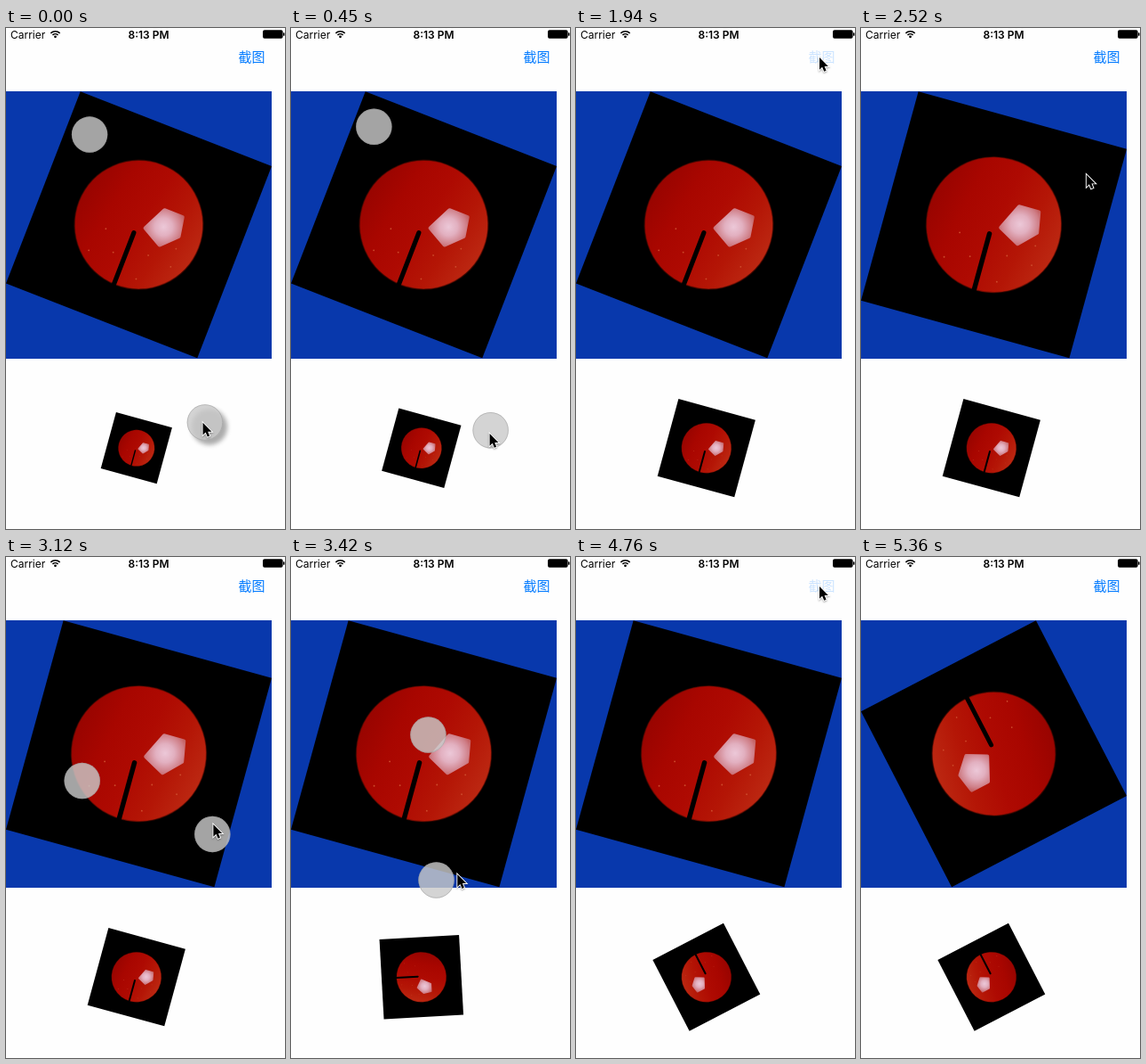
An HTML page with a canvas that plays this animation: 314x562 px, repeating every 5.77 s.

```html
<!DOCTYPE html>
<html lang="zh">
<head>
<meta charset="utf-8">
<style>
  html, body { margin: 0; width: 100%; height: 100%; overflow: hidden; background: #fefefe; }
  canvas { display: block; }
</style>
</head>
<body>
<canvas id="stage" width="314" height="562"></canvas>
<script>
const ctx = document.getElementById('stage').getContext('2d');
const LOOP = 5770, STEP = 148.9, LAST = 36;
const TAU = Math.PI * 2, RAD = Math.PI / 180;
const PIVOT = { x: 159, y: 281 };
const BUTTON = { x: 274, y: 33 };
const ANGLES = { first: 21.25, second: 15.4, third: 152.6 };

const mix = (a, b, f) => a + (b - a) * f;
const ramp = (k, from, to) => Math.max(0, Math.min(1, (k - from) / (to - from)));
const smooth = (k, from, to) => {
  const f = ramp(k, from, to);
  return f * f * (3 - 2 * f);
};

const turn = k => 11 + 151.6 * smooth(k, 20, 26) - 10 * smooth(k, 26, 28);

function finger(k) {
  const opening = ramp(k, 0, 7);
  const [angle, reach] = k < 14
    ? [mix(68.1, 70, opening), mix(174, 238.8, opening ** 2.4)]
    : [turn(k), mix(78, 84, smooth(k, 19, 26))];
  return { x: reach * Math.cos(angle * RAD), y: reach * Math.sin(angle * RAD) };
}

function pointer(k) {
  const f = finger(k < 14 ? k + .5 : k - .5);
  const toButton = k < 14 ? smooth(k, 8, 12)
    : k < 20 ? 1 - smooth(k, 14, 18) : smooth(k, 28, 30.5);
  return {
    x: mix(PIVOT.x + f.x - 2, BUTTON.x, toButton),
    y: mix(PIVOT.y + f.y, BUTTON.y, toButton)
  };
}

function disc(x, y, r, fill) {
  ctx.fillStyle = fill;
  ctx.beginPath();
  ctx.arc(x, y, r, 0, TAU);
  ctx.fill();
}

function text(str, x, y, font, fill) {
  ctx.font = font;
  ctx.fillStyle = fill;
  ctx.fillText(str, x, y);
}

function shade(gradient, ...colors) {
  colors.forEach((c, i) => gradient.addColorStop(i / (colors.length - 1), c));
  return gradient;
}

// Black tile with a glossy ball, designed on a 232 unit square
function tile(x, y, side, angle) {
  ctx.save();
  ctx.translate(x, y);
  ctx.rotate(angle * RAD);
  ctx.scale(side / 232, side / 232);
  ctx.fillStyle = '#000';
  ctx.fillRect(-116, -116, 232, 232);

  disc(0, 0, 72.5, shade(ctx.createLinearGradient(-72, -15, 72, 15),
    '#980400', '#a80600', '#ae0a02', '#b41606', '#bc2812'));
  ctx.strokeStyle = 'rgba(90,10,0,.5)';
  ctx.lineWidth = 1.5;
  ctx.stroke();
  for (let i = 0; i < 8; i++) {
    const a = .2 + i * .35, r = 50 + 14 * Math.sin(i * 2.4);
    disc(r * Math.cos(a), r * Math.sin(a), .9, '#cc4c2c');
  }

  ctx.beginPath();
  for (const p of [[8, 1], [21, -26], [43, -26], [47, -4], [30, 13]]) ctx.lineTo(...p);
  ctx.closePath();
  ctx.fillStyle = ctx.strokeStyle = shade(ctx.createRadialGradient(27, -8, 0, 27, -8, 30),
    '#ecc8d8', '#e2b0c0', '#cf7f88', '#b8403c');
  ctx.lineWidth = 4;
  ctx.lineJoin = 'round';
  ctx.fill();
  ctx.stroke();

  ctx.strokeStyle = '#000';
  ctx.lineWidth = 5.2;
  ctx.lineCap = 'round';
  ctx.beginPath();
  ctx.moveTo(-2, 10.5);
  ctx.lineTo(-2, 73);
  ctx.stroke();
  ctx.restore();
}

function snapshot(angle) {
  ctx.fillStyle = '#0838ac';
  ctx.fillRect(0, 71, 299, 300);
  const a = angle * RAD;
  tile(149.5, 220.7, 299 / (Math.abs(Math.cos(a)) + Math.abs(Math.sin(a))), angle);
}

function statusBar() {
  text('Carrier', 5, 11.5, '12px Inter, sans-serif', '#000');
  text('8:13 PM', 137.5, 11.5, '600 12px Inter, sans-serif', '#000');
  ctx.strokeStyle = '#000';
  ctx.lineWidth = 1.6;
  for (const r of [4.3, 7.3]) {
    ctx.beginPath();
    ctx.arc(55.5, 11, r, -135 * RAD, -45 * RAD);
    ctx.stroke();
  }
  disc(55.5, 9.8, 1.4, '#000');
  ctx.beginPath();
  ctx.roundRect(289, 2.3, 22.6, 9.4, 2);
  ctx.roundRect(312, 5.2, 1.5, 3.6, .6);
  ctx.fill();
}

function touch(x, y, raised) {
  ctx.save();
  if (raised) {
    ctx.shadowColor = 'rgba(0,0,0,.4)';
    ctx.shadowBlur = 5;
    ctx.shadowOffsetX = ctx.shadowOffsetY = 5;
  }
  disc(x, y, 20.2, 'rgba(202,202,202,.81)');
  ctx.restore();
  ctx.strokeStyle = 'rgba(140,140,140,.5)';
  ctx.lineWidth = .8;
  ctx.beginPath();
  ctx.arc(x, y, 19.8, 0, TAU);
  ctx.stroke();
}

const arrow = new Path2D('M0 0V14.5L3.3 11.4 5.5 16.6 8 15.5 5.9 10.5H10.4Z');
function cursor({ x, y }) {
  ctx.save();
  ctx.translate(x, y);
  ctx.scale(.95, .95);
  ctx.shadowColor = 'rgba(0,0,0,.35)';
  ctx.shadowBlur = 2;
  ctx.shadowOffsetY = 1;
  ctx.strokeStyle = '#fff';
  ctx.lineWidth = 2;
  ctx.stroke(arrow);
  ctx.shadowColor = 'transparent';
  ctx.fillStyle = '#000';
  ctx.fill(arrow);
  ctx.restore();
}

function draw(k) {
  ctx.fillStyle = '#fefefe';
  ctx.fillRect(0, 0, 314, 562);
  statusBar();

  const pressed = (k > 11 && k < 14) || (k > 30 && k < 33);
  text('截图', 261.5, 38, '15px "Noto Sans CJK SC", "Noto Sans CJK", sans-serif',
    pressed ? '#cce4ff' : '#007aff');
  snapshot(k < 14 ? ANGLES.first : k < 33 ? ANGLES.second : ANGLES.third);

  // The view follows the fingers only once they have turned far enough
  const side = mix(65.3, 89.7, ramp(k, 0, 7) ** 1.4);
  tile(146.8, 471.2, side, turn(k) < 30 ? 15.3 : turn(k));

  if (k <= 8 || (k >= 19 && k <= 28)) {
    const f = finger(k);
    touch(PIVOT.x - f.x, PIVOT.y - f.y);
    touch(PIVOT.x + f.x, PIVOT.y + f.y, k === 0);
  }
  if (k < LAST) cursor(pointer(k));
}

const start = performance.now();
function tick() {
  const t = (performance.now() - start) % LOOP;
  draw(Math.min(LAST, Math.floor((t + 8) / STEP)));
  requestAnimationFrame(tick);
}
tick();
</script>
</body>
</html>
```
